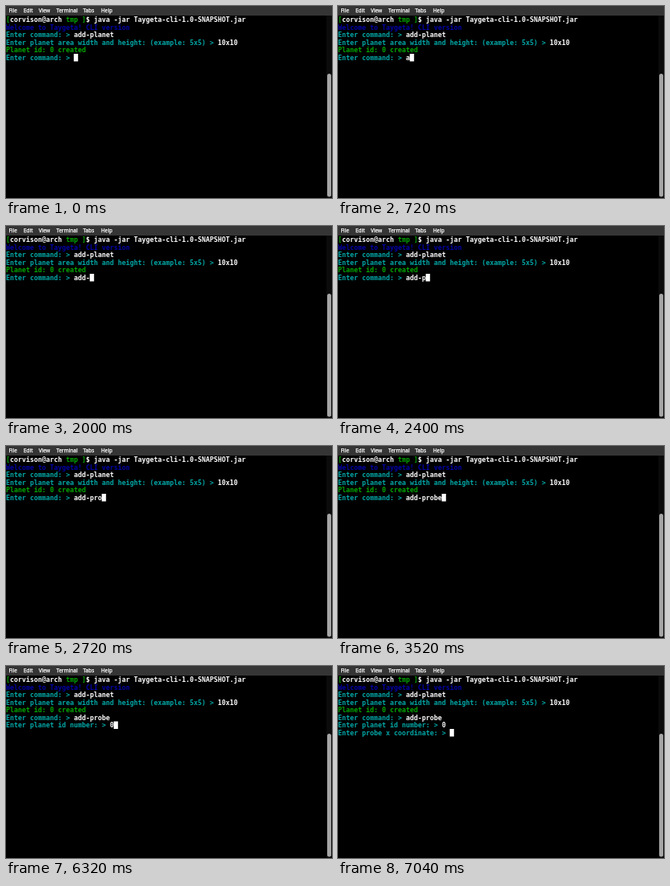
Write an HTML page with a canvas that moves like this. It is 408 px wide and 241 px high and loops after 8000 ms.

```html
<!DOCTYPE html>
<html lang="en">
<head>
<meta charset="utf-8">
<title>Terminal</title>
<style>
html, body { margin: 0; width: 100%; height: 100%; overflow: hidden; background: #000; }
canvas { display: block; }
</style>
</head>
<body>
<canvas id="stage" width="408" height="241"></canvas>
<script>
const ctx = document.getElementById('stage').getContext('2d');
const LOOP = 8000;
const CELL_W = 5, CELL_H = 9.5, TOP = 12.5;
const WHITE = '#ffffff', CYAN = '#00a8a8', GREEN = '#00a800', BLUE = '#0000a8';
const MONO = 'bold 8.3px "DejaVu Sans Mono", monospace';
const SANS = '6.5px "Noto Sans", "Open Sans", sans-serif';

const MENU = [['File', 3.5], ['Edit', 22], ['View', 41], ['Terminal', 63], ['Tabs', 96.5], ['Help', 119]];

const HISTORY = [
  [['[', GREEN], ['corvison@arch ', WHITE], ['tmp ]', GREEN],
   ['$ java -jar Taygeta-cli-1.0-SNAPSHOT.jar', WHITE]],
  [['Welcome to Taygeta! CLI version', BLUE]],
  [['Enter command: > ', CYAN], ['add-planet', WHITE]],
  [['Enter planet area width and height: (example: 5x5) > ', CYAN], ['10x10', WHITE]],
  [['Planet id: 0 created', GREEN]]
];

const COMMAND = 'add-probe';
const KEY_TIMES = [720, 1120, 1360, 2000, 2400, 2560, 2720, 3120, 3520];
const ENTER = 4080, ID_PROMPT = 4160, ID_KEY = 6320, X_PROMPT = 7040;

function linesAt(t) {
  const typed = COMMAND.slice(0, KEY_TIMES.filter(k => k <= t).length);
  const lines = [...HISTORY, [['Enter command: > ', CYAN], [typed, WHITE]]];
  if (t >= ID_PROMPT) {
    lines.push([['Enter planet id number: > ', CYAN], [t >= ID_KEY ? '0' : '', WHITE]]);
  } else if (t >= ENTER) {
    lines.push([]);
  }
  if (t >= X_PROMPT) lines.push([['Enter probe x coordinate: > ', CYAN]]);
  return lines;
}

// Returns the column after the last character.
function drawLine(parts, row) {
  let col = 0;
  for (const [text, color] of parts) {
    ctx.fillStyle = color;
    for (const ch of text) {
      ctx.fillText(ch, col * CELL_W, TOP + row * CELL_H + 7.5);
      col++;
    }
  }
  return col;
}

function drawWindow() {
  ctx.fillStyle = '#000';
  ctx.fillRect(0, 0, 408, 241);
  ctx.fillStyle = '#353535';
  ctx.fillRect(0, 0, 408, 12);
  ctx.fillStyle = '#0b0b0b';
  ctx.fillRect(401, 12, 7, 229);
  ctx.fillStyle = '#a6a6a6';
  ctx.beginPath();
  ctx.roundRect(402, 85, 5, 154.5, 2.5);
  ctx.fill();
  ctx.font = SANS;
  ctx.fillStyle = ctx.strokeStyle = '#fff';
  ctx.lineWidth = 0.25;
  for (const [label, x] of MENU) {
    ctx.fillText(label, x, 8);
    ctx.strokeText(label, x, 8);
  }
}

function draw(t) {
  drawWindow();
  ctx.font = MONO;
  const lines = linesAt(t);
  let col = 0;
  lines.forEach((parts, row) => { col = drawLine(parts, row); });
  ctx.fillStyle = '#fff';
  ctx.fillRect(col * CELL_W - 0.2, TOP + (lines.length - 1) * CELL_H, 5.4, CELL_H);
}

const start = performance.now();
function tick(now) {
  draw(Math.max(0, now - start) % LOOP);
  requestAnimationFrame(tick);
}
draw(0);
requestAnimationFrame(tick);
</script>
</body>
</html>
```
